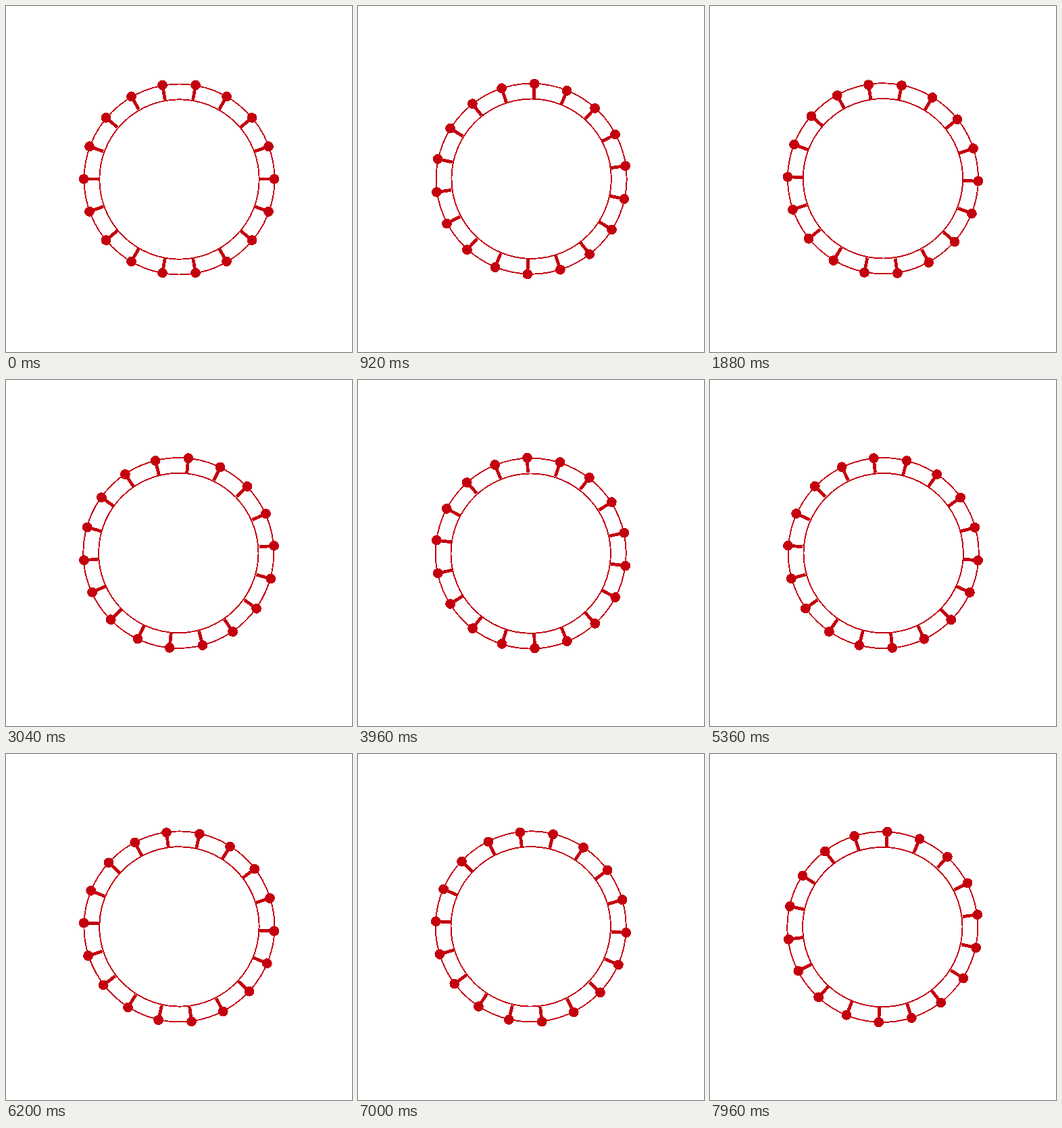
Write an HTML page that moves like this. It is 512 px wide and 512 px high and loops after 8 s.

```html
<!DOCTYPE html>
<html lang="en">
<head>
<meta charset="utf-8">
<title>Rotating ring</title>
<style>
  html, body { margin: 0; width: 100%; height: 100%; overflow: hidden; background: #fff; }
  svg { display: block; width: 100%; height: 100%; }
</style>
</head>
<body>
<svg viewBox="0 0 512 512" shape-rendering="crispEdges">
  <g id="ring" fill="none" stroke="#c4000e" stroke-width="1.9">
    <!-- the rails sit slightly off the pivot, so they wobble as they turn -->
    <circle cx="256.5" cy="256.5" r="141"/>
    <circle cx="256.5" cy="256.5" r="118.2"/>
  </g>
</svg>
<script>
  const NS = 'http://www.w3.org/2000/svg';
  const COUNT = 18, LOOP = 8000, STEP = 40, DEG_PER_STEP = -2.952;
  const ring = document.getElementById('ring');

  function add(parent, tag, attrs) {
    const el = document.createElementNS(NS, tag);
    for (const key in attrs) el.setAttribute(key, attrs[key]);
    return parent.appendChild(el);
  }

  for (let i = 0; i < COUNT; i++) {
    const arm = add(ring, 'g', { transform: `rotate(${i * 360 / COUNT} 256 256)` });
    add(arm, 'line', { x1: 375, y1: 256, x2: 397, y2: 256, 'stroke-width': 4.8 });
    add(arm, 'circle', { cx: 397, cy: 256, r: 7.4, fill: '#c4000e', stroke: 'none' });
  }

  function draw(ms) {
    const step = Math.floor((ms % LOOP) / STEP + 1e-6);
    ring.setAttribute('transform', `rotate(${step * DEG_PER_STEP} 256 256)`);
  }

  const start = performance.now();
  function tick() {
    draw(performance.now() - start);
    requestAnimationFrame(tick);
  }
  draw(0);
  requestAnimationFrame(tick);
</script>
</body>
</html>
```
